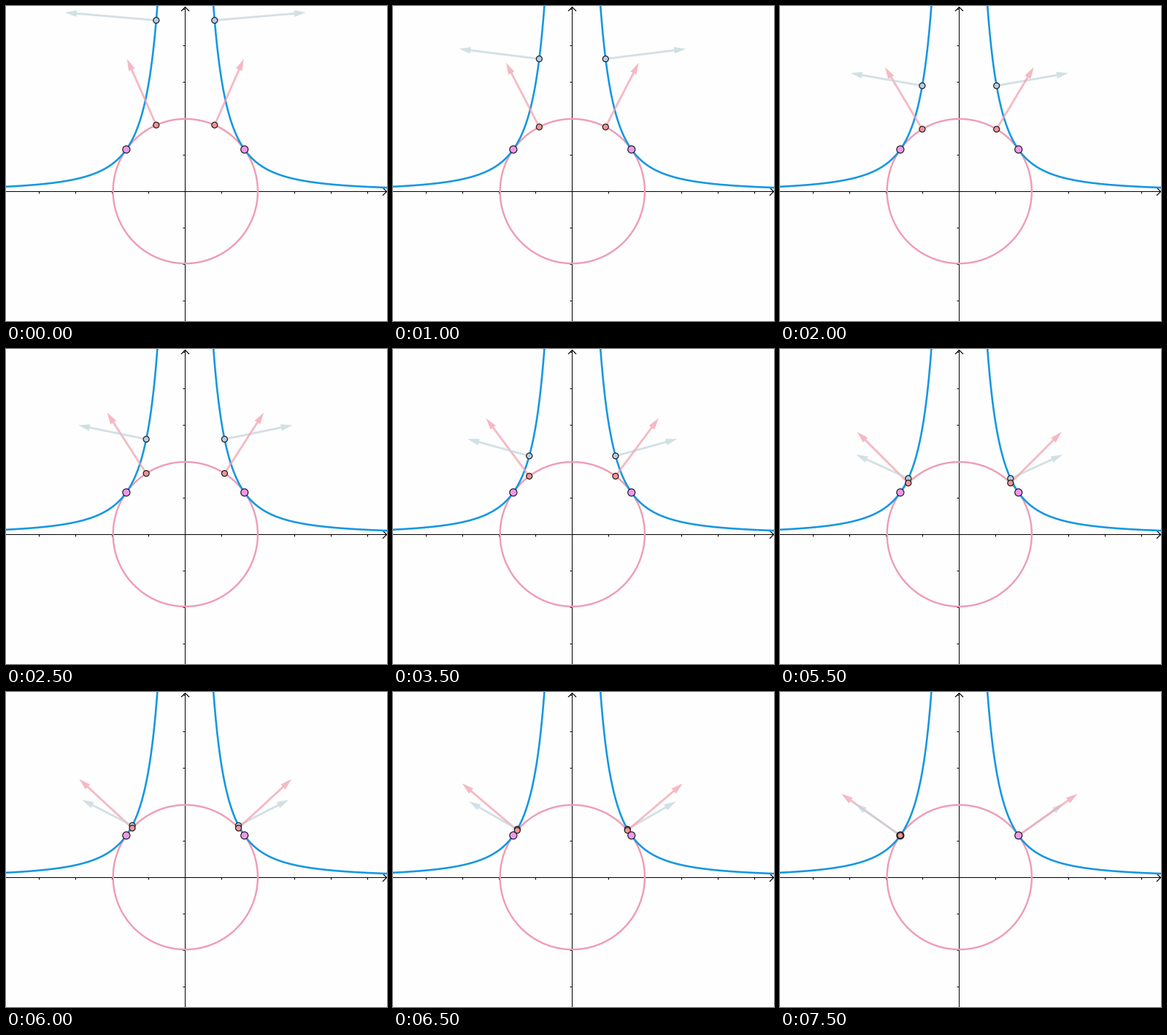
A matplotlib script that plays this animation: 522 px wide and 432 px high, repeating every 8 s.

```python
import numpy as np
import matplotlib.pyplot as plt
from matplotlib.animation import FuncAnimation
from matplotlib.patches import Circle, Polygon

W, H = 522, 432
FRAMES, INTERVAL = 16, 500
ORIGIN = np.array([245.8, 254.0])
UNIT = 50
X_START = 0.8
X_TOUCH = 18 ** (1 / 6)  # where y = 3/x^2 touches the circle
RADIUS = np.hypot(X_TOUCH, 3 / X_TOUCH**2)

BLUE, PINK = "#1697e2", "#f09cb4"
PALE_PINK, PALE_BLUE = "#f3a2b0", "#c4d6de"
RED_DOT, BLUE_DOT, VIOLET_DOT = "#f19494", "#b6cce2", "#ee98ee"


def to_px(x, y):
    return np.column_stack([ORIGIN[0] + UNIT * np.atleast_1d(x),
                            ORIGIN[1] - UNIT * np.atleast_1d(y)])


def arrow_outline(start, vector, shaft=1.4, head=4.6, head_length=16):
    """Pixel outline of an arrow given in plane coordinates."""
    tail = to_px(*start)[0]
    tip = to_px(*np.add(start, vector))[0]
    along = (tip - tail) / np.hypot(*(tip - tail))
    side = np.array([-along[1], along[0]])
    neck = tip - head_length * along
    return [tail + shaft * side, neck + shaft * side, neck + head * side, tip,
            neck - head * side, neck - shaft * side, tail - shaft * side]


fig = plt.figure(figsize=(W / 72, H / 72), dpi=72, facecolor="#fefefe")
ax = fig.add_axes([0, 0, 1, 1])
ax.set_xlim(0, W)
ax.set_ylim(H, 0)
ax.axis("off")


def line(xs, ys, color="black", width=1.0, z=1):
    ax.plot(xs, ys, color=color, lw=width, zorder=z, snap=False,
            solid_capstyle="butt")


def draw_axes():
    cx, cy = 245.5, 254.5  # pixel centres keep the thin lines crisp
    line([0, W], [cy, cy])
    line([cx, cx], [1, H])
    line([W - 6, W - 0.5, W - 6], [cy - 5.5, cy, cy + 5.5], width=1.2)
    line([cx - 5.5, cx, cx + 5.5], [7, 1.5, 7], width=1.2)
    for k in range(-4, 6):
        if k:
            line([cx + k * UNIT] * 2, [cy, cy + 3])
            line([cx - 3, cx], [cy - k * UNIT] * 2)


def draw_curves():
    angle = np.linspace(0, 2 * np.pi, 400)
    ring = to_px(RADIUS * np.cos(angle), RADIUS * np.sin(angle))
    line(*ring.T, PINK, 2.4, 2)
    xs = np.linspace(0.6, 6, 600)
    for side in (-1, 1):
        line(*to_px(side * xs, 3 / xs**2).T, BLUE, 2.6, 3)


def add_dot(radius, color, z):
    dot = Circle((0, 0), radius, fc=color, ec="#1c1c1c", lw=1.2, zorder=z)
    return ax.add_patch(dot)


def add_arrow(color, z):
    return ax.add_patch(Polygon(np.zeros((7, 2)), fc=color, ec="none",
                                alpha=0.75, zorder=z))


draw_axes()
draw_curves()

sides = {}
for side in (-1, 1):
    # The stacking order differs between the two halves.
    sides[side] = dict(
        radial=add_arrow(PALE_PINK, 5 if side > 0 else 4),
        normal=add_arrow(PALE_BLUE, 4 if side > 0 else 5),
        high=add_dot(4, BLUE_DOT, 7),
        low=add_dot(4, RED_DOT, 8),
    )
    touch = add_dot(5, VIOLET_DOT, 9 if side > 0 else 6)
    touch.center = to_px(side * X_TOUCH, 3 / X_TOUCH**2)[0]


def update(frame):
    x = X_START + (X_TOUCH - X_START) * frame / (FRAMES - 1)
    y_curve = 3 / x**2
    y_ring = np.sqrt(RADIUS**2 - x**2)
    changed = []
    for side, parts in sides.items():
        on_curve, on_ring = (side * x, y_curve), (side * x, y_ring)
        parts["high"].center = to_px(*on_curve)[0]
        parts["low"].center = to_px(*on_ring)[0]
        # Gradients of ln(x^2 y) and of (x^2 + y^2) / 2.
        parts["normal"].set_xy(
            arrow_outline(on_curve, (side * 2 / x, 1 / y_curve)))
        parts["radial"].set_xy(arrow_outline(on_ring, on_ring))
        changed += parts.values()
    return changed


anim = FuncAnimation(fig, update, frames=FRAMES, interval=INTERVAL,
                     repeat=True, repeat_delay=0)
plt.show()
```
